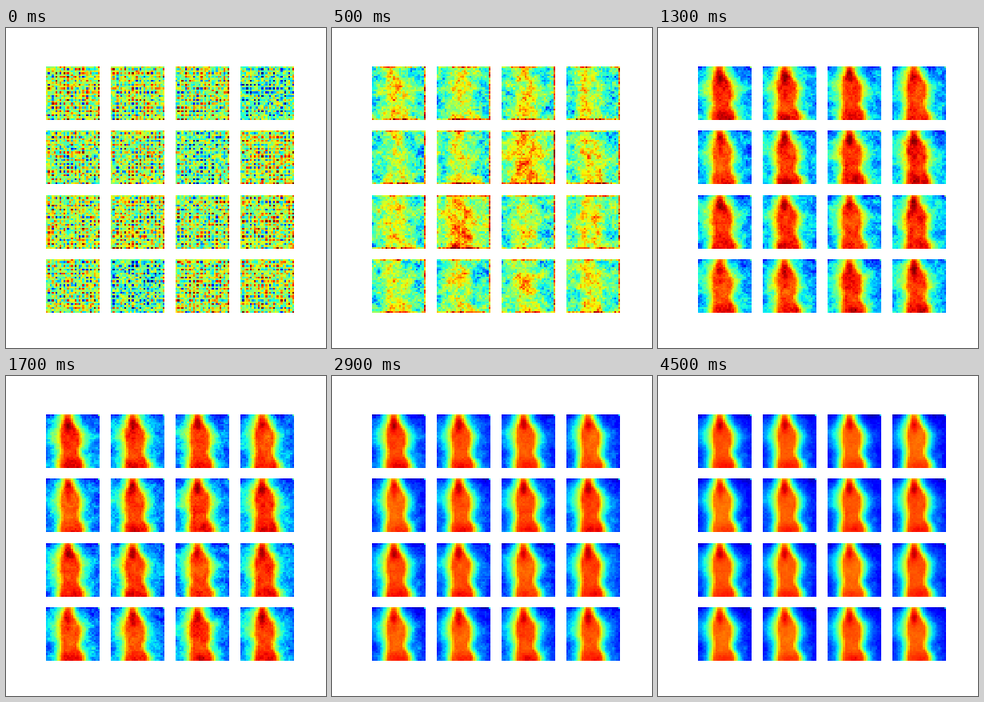
An HTML page with a canvas that plays this animation: 400 by 400 pixels, repeating every 4.6 s.

```html
<!DOCTYPE html>
<html lang="en">
<head>
<meta charset="utf-8">
<title>Heatmap grid</title>
<style>
html, body { margin: 0; width: 100%; height: 100%; overflow: hidden; background: #fff; }
canvas { display: block; width: 400px; height: 400px; }
</style>
</head>
<body>
<canvas id="stage" width="400" height="400"></canvas>
<script>
const ctx = document.getElementById('stage').getContext('2d');
const CELLS = 28, LAST = CELLS - 1, SIZE = 67, STEP = 100, STEPS = 46;
const COOL = [3, 6, 13];  // tiles that start out bluish
const WARM = [6, 9];      // tiles that glow while the noise blurs

const clamp = (v, a = 0, b = 1) => Math.min(b, Math.max(a, v));
const mix = (a, b, k) => a + (b - a) * k;
const bell = (v, mid, width) => Math.exp(-(((v - mid) / width) ** 2));
const fade = (t, span) => Math.exp(-t / span);
const smooth = (a, b, v) => {
  const k = clamp((v - a) / (b - a));
  return k * k * (3 - 2 * k);
};

// Repeatable random value from -1 to 1
function rand(x, y, seed) {
  let h = Math.imul(x + 11, 374761393) ^ Math.imul(y + 7, 668265263) ^ Math.imul(seed + 3, 1274126177);
  h = Math.imul(h ^ (h >>> 15), 2246822519);
  h = Math.imul(h ^ (h >>> 13), 3266489917);
  return ((h ^ (h >>> 16)) >>> 0) / 2147483648 - 1;
}

function softRand(x, y, seed, scale) {
  const u = x / scale, v = y / scale, i = Math.floor(u), j = Math.floor(v);
  const top = mix(rand(i, j, seed), rand(i + 1, j, seed), u - i);
  const bottom = mix(rand(i, j + 1, seed), rand(i + 1, j + 1, seed), u - i);
  return mix(top, bottom, v - j);
}

// Rainbow scale from dark blue through green to dark red
function rainbow(v) {
  const red = Math.min((v - .35) / .31, 1 + (.89 - v) / .22);
  const green = Math.min((v - .125) / .25, (.91 - v) / .27);
  const blue = Math.min(.5 + v / .22, (.65 - v) / .31);
  return `rgb(${[red, green, blue].map(c => Math.round(255 * clamp(c)))})`;
}
const PALETTE = Array.from({ length: 256 }, (_, i) => rainbow(i / 255));

// Strength of the figure: 1 in its core, .7 on the outline, 0 far away
function figure(x, y) {
  const left = .31 - .07 * smooth(.05, .35, y) + .03 * bell(y, .7, .15);
  const right = .5 + .16 * smooth(.05, .4, y) - .04 * bell(y, .7, .12) + .06 * smooth(.75, .95, y);
  const a = x - left, b = right - x, d = Math.min(a, b);
  if (d > 0) return .7 + .3 * Math.min(1, d / .065);
  const reach = a < b ? .1 + .09 * bell(y, .38, .25) : .1 + .03 * bell(y, .4, .25);
  return .7 * Math.exp(d / reach);
}

function accent(x, y) {
  return .12 * bell(x, .41, .07) * bell(y, .2, .13)
    + .07 * bell(x, .5, .2) * bell(y, .96, .1)
    - .08 * bell(y, 0, .05)
    + .08 * bell(x, .88, .06) * bell(y, .76, .07)
    + .3 * (x > .97 && y < .03);
}

const cells = [];
for (let j = 0; j < CELLS; j++) {
  for (let i = 0; i < CELLS; i++) {
    const x = (i + .5) / CELLS, y = (j + .5) / CELLS;
    cells.push({ i, j, shape: figure(x, y), accent: accent(x, y) });
  }
}

function levels(t) {
  const form = smooth(3, 13, t), check = fade(t, 2.2);
  return {
    form, check,
    low: .095 + .435 * fade(t, 13),
    high: mix(.53 + .012 * t, .8 + .1 * fade(t, 20), form),
    grain: (.022 + .15 * fade(t, 11)) * (1 - .5 * check),
    blobs: (.02 + .2 * fade(t, 14)) * (1 - .8 * check),
    rim: bell(t, 5, 3.5)
  };
}

function tileTint(tile, lv) {
  const early = COOL.includes(tile) ? -.05 : .02;
  const glow = WARM.includes(tile) ? .11 : 0;
  return lv.check * early + lv.rim * glow + .02 * rand(tile, 0, 41);
}

// Noise on a lattice: strongest where both indices are odd
function checker(i, j, tile) {
  const n = rand(i, j, tile + 900), odd = i % 2 + j % 2;
  if (odd === 2) return .46 * n + (COOL.includes(tile) ? -.12 : 0) + (i === LAST ? .15 : 0);
  return (odd ? .22 : .05) * n;
}

function rim(i, j, seed) {
  const n = rand(i, j, seed + 700);
  if (i === LAST) return .36 + .14 * n;
  if (j === LAST) return .2 + .12 * n;
  return j === 0 ? .17 + .1 * n : 0;
}

const edge = k => Math.round(k * SIZE / CELLS);

function drawTile(tile, step, lv) {
  const x0 = Math.round(50.1 + (tile % 4) * 80.87);
  const y0 = Math.round(48 + Math.floor(tile / 4) * 80.35);
  const tint = tileTint(tile, lv), seed = tile + 16 * step;
  for (const { i, j, shape, accent } of cells) {
    const grain = .8 * rand(i, j, tile) + .4 * rand(i, j, seed + 200);
    const blobs = .95 * softRand(i, j, tile + 50, 2.8) + .4 * softRand(i, j, seed + 1500, 2.4);
    const noise = lv.grain * grain + lv.blobs * blobs;
    const v = mix(lv.low, lv.high, shape) + accent * lv.form
      + tint + noise * (1 - .5 * shape * lv.form)
      + lv.check * checker(i, j, tile) + lv.rim * rim(i, j, seed);
    const x = edge(i), y = edge(j);
    ctx.fillStyle = PALETTE[Math.round(255 * clamp(v, .02))];
    ctx.fillRect(x0 + x, y0 + y, edge(i + 1) - x, edge(j + 1) - y);
  }
}

function draw(step) {
  const lv = levels(step);
  ctx.fillStyle = '#fff';
  ctx.fillRect(0, 0, 400, 400);
  for (let tile = 0; tile < 16; tile++) drawTile(tile, step, lv);
}

const start = performance.now();
let shown = -1;
function tick() {
  const step = Math.floor((performance.now() - start) / STEP) % STEPS;
  if (step !== shown) draw(shown = step);
  requestAnimationFrame(tick);
}
tick();
</script>
</body>
</html>
```
